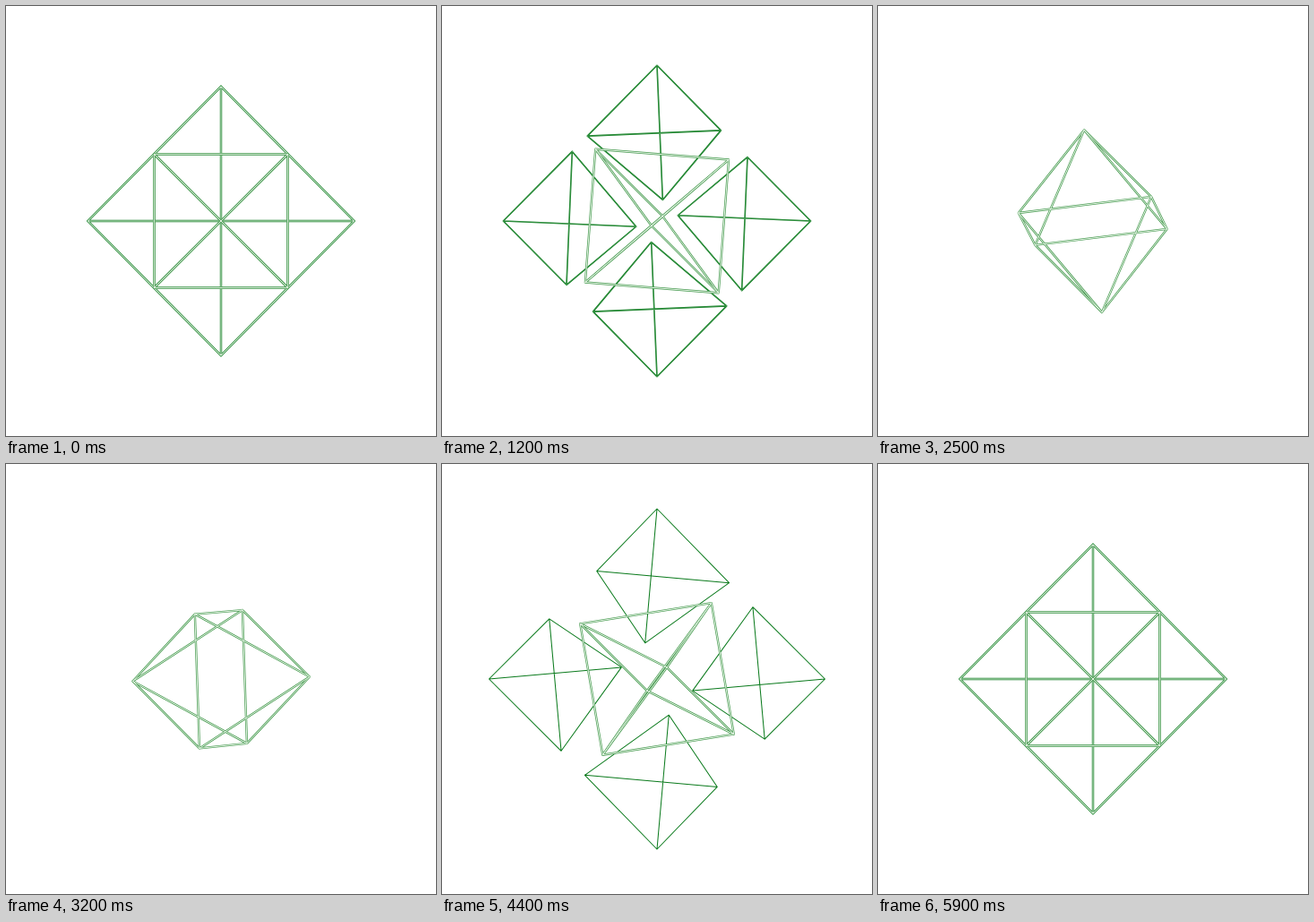
Write an HTML page with a canvas that moves like this. It is 480 by 480 pixels and loops after 6 s.

```html
<!DOCTYPE html>
<html lang="en">
<head>
<meta charset="utf-8">
<title>Tetrahedron dissection</title>
<style>
  html, body { margin: 0; width: 100%; height: 100%; overflow: hidden; background: #fff; }
  canvas { display: block; }
</style>
</head>
<body>
<canvas id="stage" width="480" height="480"></canvas>
<script>
const ctx = document.getElementById('stage').getContext('2d');
const UNIT = 74.7, CAMERA = 270, LOOP = 6000, STEP = 100;
const H = Math.SQRT2;

// Corners of a regular tetrahedron seen along a two-fold axis.
const corners = [[0, -2, H], [-2, 0, -H], [2, 0, -H], [0, 2, H]];
const midpoint = (a, b) => a.map((v, i) => (v + b[i]) / 2);
const unit = v => v.map(c => c / Math.hypot(...v));
const pairs = list => list.flatMap((a, i) => list.slice(i + 1).map(b => [a, b]));

// Opposite midpoints sit at i and 5 - i.
const midpoints = pairs(corners).map(([a, b]) => midpoint(a, b));
const octaAxis = unit([1, 1, H]);

const smooth = x => x * x * (3 - 2 * x);
const ease = x => smooth(smooth(x));

function rotate(v, n, angle) {
  const c = Math.cos(angle), s = Math.sin(angle);
  const dot = v[0] * n[0] + v[1] * n[1] + v[2] * n[2];
  return v.map((value, i) => {
    const j = (i + 1) % 3, k = (i + 2) % 3;
    return value * c + (n[j] * v[k] - n[k] * v[j]) * s + n[i] * dot * (1 - c);
  });
}

function project([x, y, z]) {
  const scale = UNIT * (1 + z / CAMERA);
  return [240 + x * scale, 240 + y * scale];
}

// Thin tube: coloured sides with a pale core when it is wide enough.
function drawTubes(edges, width, color) {
  if (width <= 0) return;
  ctx.beginPath();
  for (const [a, b] of edges) {
    ctx.moveTo(...project(a));
    ctx.lineTo(...project(b));
  }
  ctx.lineWidth = width;
  ctx.strokeStyle = color;
  ctx.stroke();
  if (width > 1.5) {
    ctx.lineWidth = width - 1.4;
    ctx.strokeStyle = '#e2f2e2';
    ctx.stroke();
  }
}

function draw(time) {
  const p = (Math.floor(time % LOOP / STEP) + 0.5) * STEP / LOOP;
  const turn = ease(p) * Math.PI;
  const spread = ease(1 - Math.abs(1 - 2 * p));

  ctx.fillStyle = '#fff';
  ctx.fillRect(0, 0, 480, 480);
  ctx.lineCap = 'round';

  const tetraEdges = corners.flatMap(apex => {
    const axis = unit(apex);
    return pairs(corners.map(corner =>
      rotate(midpoint(apex, corner), axis, -turn * 2 / 3)
        .map((v, i) => v + axis[i] * 1.2 * spread)));
  });
  drawTubes(tetraEdges, 2.6 * (0.93 - spread), '#0a7a1c');

  const points = midpoints.map(v => rotate(v, octaAxis, turn));
  const octaEdges = pairs(points).filter(([a, b]) =>
    points.indexOf(a) + points.indexOf(b) !== 5);
  drawTubes(octaEdges, 2.4, '#4f9f58');
}

function tick() {
  draw(performance.now());
  requestAnimationFrame(tick);
}
tick();
</script>
</body>
</html>
```
